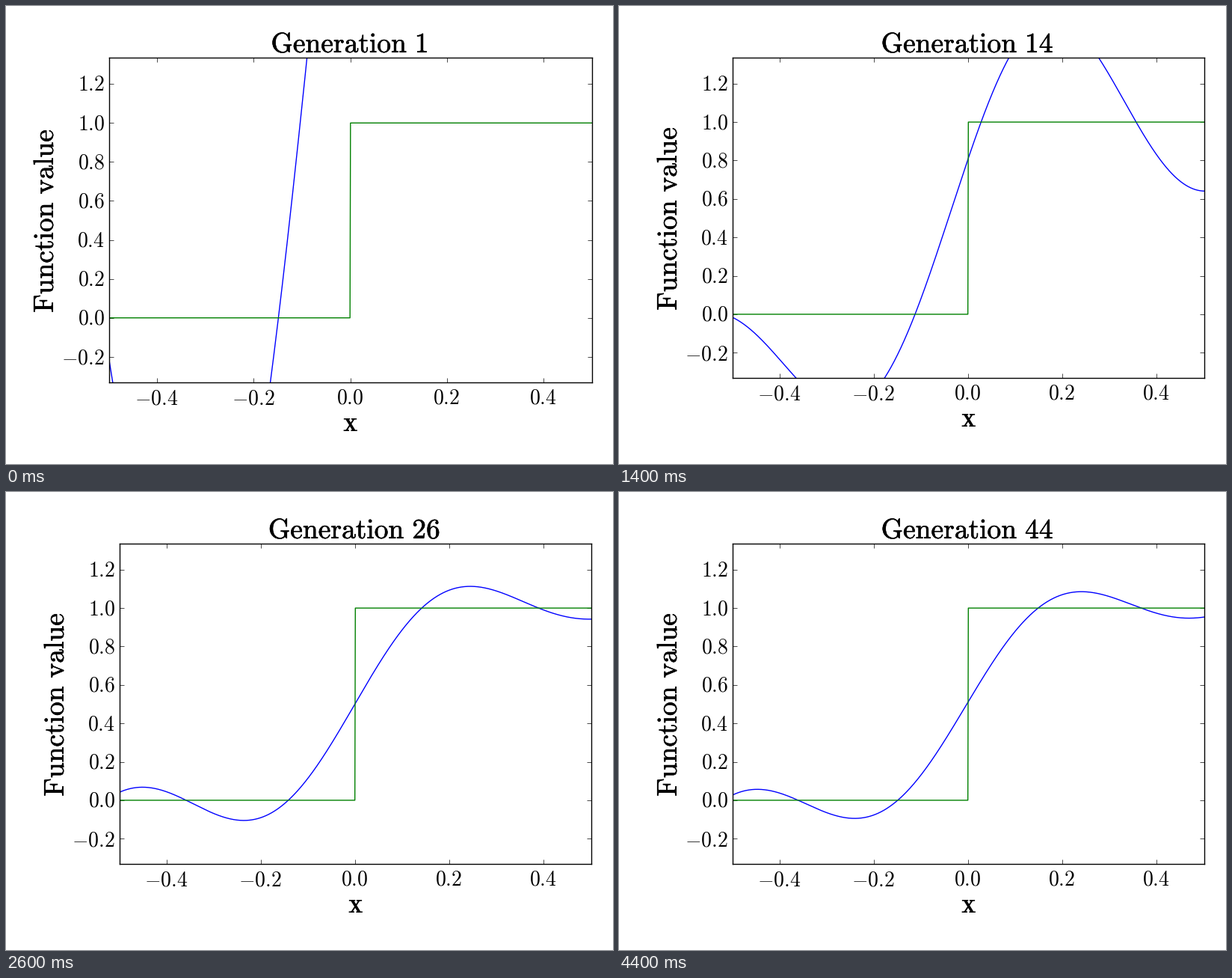
A matplotlib script for the animation above (4.5 s loop, 812 by 612 pixels).

```python
import numpy as np
import matplotlib.pyplot as plt
from matplotlib.animation import FuncAnimation
from matplotlib.patheffects import withStroke

W, H, DPI = 812, 612, 100
EPS = 1e-5  # keeps the pixel size from rounding down
plt.rcParams["mathtext.fontset"] = "cm"

# Points (x, y) and x positions of level tangents of the best curve, by generation.
CURVES = {
    1: ([(-.5, -.209), (-.4915, -.333), (-.33, -2.5), (-.1656, -.333),
         (-.1486, 0), (-.1045, 1), (-.089, 1.332), (.1, 6), (.3, 5), (.5, 3)],
        []),
    7: ([(-.5, -.6), (-.35, -1.2), (-.2036, -.333), (-.1743, 0), (-.091, 1),
         (-.0634, 1.332), (.1, 2.3), (.2718, 1.332), (.3383, 1), (.405, .886),
         (.476, 1), (.5, 1.081)],
        [.405]),
    14: ([(-.5, -.016), (-.3637, -.333), (-.27, -.55), (-.176, -.333),
          (-.1133, 0), (0, .811), (.0277, 1), (.0864, 1.332), (.18, 1.6),
          (.2773, 1.332), (.357, 1), (.5, .639)],
         [.5]),
    18: ([(-.5, .13), (-.483, .132), (-.375, 0), (-.2275, -.221), (-.109, 0),
          (0, .519), (.104, 1), (.2195, 1.198), (.371, 1), (.5, .878)],
         [-.483, -.2275, .2195, .5]),
    26: ([(-.5, .042), (-.4525, .065), (-.357, 0), (-.234, -.104), (-.141, 0),
          (0, .503), (.141, 1), (.242, 1.112), (.389, 1), (.5, .943)],
         [-.4525, -.234, .242, .5]),
    35: ([(-.5, .035), (-.449, .059), (-.36, 0), (-.238, -.095), (-.146, 0),
          (0, .511), (.147, 1), (.238, 1.086), (.367, 1), (.474, .946), (.5, .95)],
         [-.449, -.238, .238, .474]),
    44: ([(-.5, .028), (-.447, .054), (-.36, 0), (-.239, -.092), (-.148, 0),
          (0, .512), (.148, 1), (.238, 1.084), (.366, 1), (.472, .949), (.5, .953)],
         [-.447, -.239, .238, .472]),
}
FREQ = np.pi * np.arange(1, 4)


def basis(x):
    a = np.outer(x, FREQ)
    return np.hstack([np.ones((len(a), 1)), np.cos(a), np.sin(a)])


def slopes(x):
    a = np.outer(x, FREQ)
    return np.hstack([np.zeros((len(a), 1)), -FREQ * np.sin(a), FREQ * np.cos(a)])


def fit(points, flat):
    """Weighted least squares for a Fourier sum of three harmonics."""
    x, y = np.array(points).T
    w = np.where((y > -.34) & (y < 1.34), 1, .03)
    rows = np.vstack([basis(x) * w[:, None], slopes(np.array(flat)) * .05])
    goal = np.append(y * w, np.zeros(len(flat)))
    return np.linalg.lstsq(rows, goal, rcond=None)[0]


GENS = list(CURVES)
COEFS = np.array([fit(*c) for c in CURVES.values()])
XS = np.linspace(-.5, .5, 1000)
BASIS = basis(XS)

fig = plt.figure(figsize=(W / DPI + EPS, H / DPI + EPS), dpi=DPI, facecolor="white")
ax = fig.add_axes([.2, .2, .7, .7])
ax.set(xlim=(-.5, .5), ylim=(-1 / 3, 4 / 3))
XT = [-.4, -.2, 0, .2, .4]
YT = [-.2, 0, .2, .4, .6, .8, 1, 1.2]
ax.set_xticks(XT)
ax.set_yticks(YT)
ax.tick_params(direction="in", length=4, width=.5, top=True, right=True,
               labelbottom=False, labelleft=False)
for spine in ax.spines.values():
    spine.set_linewidth(1)

curve, = ax.plot(XS, XS, color="#0000ff", lw=1)
ax.plot(XS, XS > 0, color="#008000", lw=1)


def label(s, size=20, ha="center", **kw):
    return fig.text(0, 0, s, fontsize=size, ha=ha, va="baseline", **kw)


def place(text, x, y):
    text.set_position((x / W, 1 - y / H))


heavy = dict(size=27, path_effects=[withStroke(linewidth=.4, foreground="black")])
title = label("", **heavy)
ylabel = label(r"$\mathrm{Function\ value}$", rotation=90,
               rotation_mode="anchor", **heavy)
xlabel = label(r"$\mathbf{x}$", size=26.5)
xnums = [label(f"${v:.1f}$") for v in XT]
ynums = [label(f"${v:.1f}$", ha="right") for v in YT]


def arrange(left, right, top, bottom):
    w, h = right - left, bottom - top
    mid = (left + right) / 2
    ax.set_position([left / W, 1 - bottom / H, w / W, h / H])
    place(title, mid - 1, 62)
    place(xlabel, mid, bottom + 64)
    place(ylabel, left - 74.5, (top + bottom) / 2 + .5)
    for v, t in zip(XT, xnums):
        place(t, mid + v * w - .7, bottom + (29 if v < 0 else 27.5))
    for v, t in zip(YT, ynums):
        place(t, left - 5.6, bottom - (v + 1 / 3) * h * .6 + (10 if v < 0 else 9))


def draw(i):
    gen = max(1, i)
    if gen == 1:
        arrange(137.5, 783.5, 69.5, 503.5)
    else:
        arrange(151.5, 782.5, 69.5, 497.5)
    coef = [np.interp(gen, GENS, c) for c in COEFS.T]
    curve.set_ydata(BASIS @ coef)
    title.set_text(rf"$\mathrm{{Generation\ {gen}}}$")
    return []


anim = FuncAnimation(fig, draw, frames=45, interval=100, repeat=True,
                     repeat_delay=0, init_func=lambda: draw(0))
plt.show()
```
